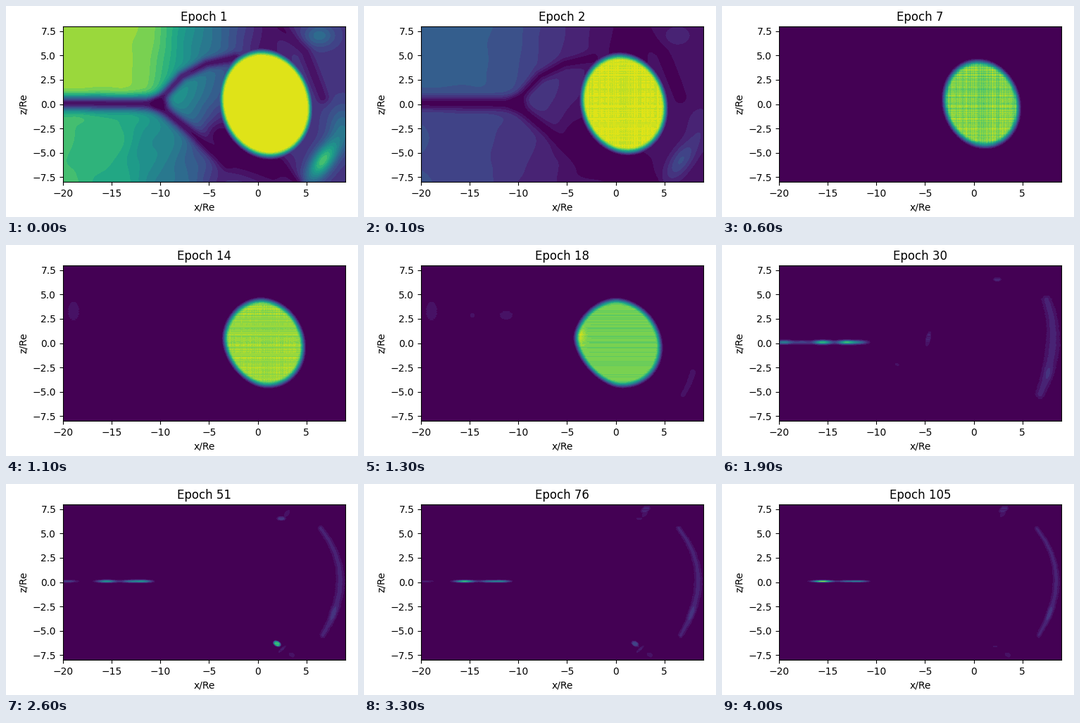
These frames come from a looping animation (500x300 px, 4.1 s). A matplotlib script:

```python
import numpy as np
import matplotlib.pyplot as plt
from matplotlib.animation import FuncAnimation

W, H = 500, 300
LEFT, RIGHT, TOP, BOTTOM = 81, 482, 29, 250
FRAMES = 41
STEP = 0.05

# All shapes below are placed in stage pixels.
X, Y = np.meshgrid(np.arange(LEFT, RIGHT) + 0.5, np.arange(TOP, BOTTOM) + 0.5)
rng = np.random.default_rng(4)
ROWS = rng.uniform(-1, 1, (BOTTOM - TOP, 1))
COLS = rng.uniform(-1, 1, (1, RIGHT - LEFT))

# Dark lanes: depth, width, path
LANES = [(.90, 11, [(70, 138), (220, 139)]),
         (.80, 8, [(215, 137), (250, 100), (285, 82), (325, 74)]),
         (.85, 9, [(215, 140), (258, 175), (315, 225)]),
         (.95, 25, [(305, 185), (335, 218), (380, 232)]),
         (.60, 9, [(390, 30), (425, 65), (450, 130)]),
         (.80, 8, [(385, 222), (412, 250)])]

# Faint patches: x, y, half width, half height, tilt, first, last, strength
PATCHES = [(96, 94, 11, 19, 0, 8, 17, .08),
           (154, 100, 4, 5, 0, 10, 16, .08),
           (202, 100, 13, 9, 0, 10, 17, .08),
           (293, 133, 5, 14, -.2, 13, 23, .10),
           (249, 170, 4, 3, .4, 16, 22, .08),
           (391, 49, 8, 4, 0, 17, 34, .15),
           (399, 42, 5, 7, -.5, 22, 50, .08),
           (400, 36, 8, 7, -.5, 28, 50, .11),
           (385, 227, 6, 5, .4, 21, 34, .65),
           (392, 235, 4, 7, -.9, 22, 38, .09),
           (388, 231, 4, 2, 0, 30, 50, .08),
           (406, 243, 6, 5, .4, 23, 50, .08)]

# Arc on the right: start, middle and end point at each key frame
ARC_TIMES = [13, 19, 26]
ARC_POINTS = [[467, 181, 462, 196, 453, 213],
              [461, 78, 470, 140, 452, 212],
              [447, 63, 475, 135, 450, 215]]


def key(n, times, values):
    """Linear interpolation of key values (scalars or rows) at frame n."""
    table = np.array(values, float).reshape(len(times), -1)
    out = np.array([np.interp(n, times, col) for col in table.T])
    return out if len(out) > 1 else out[0]


def blob(x, y, rx, ry, tilt=0):
    dy = Y - y
    return np.exp(-((X - x - tilt * dy) / rx) ** 2 - (dy / ry) ** 2)


def path_distance(path):
    best = np.full(X.shape, 1e9)
    for (x0, y0), (x1, y1) in zip(path[:-1], path[1:]):
        dx, dy = x1 - x0, y1 - y0
        t = np.clip(((X - x0) * dx + (Y - y0) * dy) / (dx * dx + dy * dy), 0, 1)
        best = np.minimum(best, np.hypot(X - x0 - t * dx, Y - y0 - t * dy))
    return best


def first_field():
    north = np.interp(X + 0.12 * (Y - 60), [170, 205, 245, 305, 365],
                      [.87, .82, .58, .34, .08])
    south = np.interp(X + 0.2 * (Y - 200), [90, 170, 235, 280, 310],
                      [.71, .63, .43, .30, .17])
    east = (.18 + .2 * blob(445, 42, 22, 16) + .2 * blob(478, 172, 22, 32)
            + .55 * blob(450, 220, 17, 28, -.5))
    ripple = 0.02 * np.sin(X / 13 + np.sin(Y / 17)) * np.cos(Y / 21)
    side = 1 / (1 + np.exp((139 - Y) / 7))
    field = north * (1 - side) + (south + ripple) * side + ripple / 2
    mix = 1 / (1 + np.exp((400 - X) / 8))
    field = field * (1 - mix) + east * mix
    for depth, width, path in LANES:
        field *= 1 - depth * np.exp(-(path_distance(path) / width) ** 2)
    return field


FIRST = first_field()


def disc(n):
    level = key(n, [0, 3, 6, 11, 13, 15, 16, 18],
                [.98, .9, .83, .87, .81, .5, .25, 0])
    if level == 0:
        return 0
    cx, rx, ry = key(n, [0, 2, 6, 11, 13, 17],
                     [(369, 70, 81), (369, 61, 69), (368.5, 58.5, 66),
                      (366.5, 61.5, 66.5), (361, 65.5, 66), (354, 66, 64)])
    nose = key(n, [9, 13], [0, 1])
    u = (X - cx) / rx
    v = (Y - 139 - 0.11 * (X - cx)) / ry
    p = np.where(u < 0, 2 - 0.3 * nose, 2)
    r = (np.abs(u) ** p + np.abs(v) ** p) ** (1 / p)
    edge = np.clip((1 - r) * rx / 12, 0, 1)
    edge = edge * edge * (3 - 2 * edge)
    row = key(n, [0, 6, 13], [.01, .08, .04])
    col = key(n, [0, 6, 11, 13], [.01, .07, .02, 0])
    glow = 0.13 * nose * blob(306, 128, 8, 14)
    return edge * (level * (1 + row * ROWS + col * COLS) + glow)


def sheet(n):
    bumps = [(88, 13, [.45, .22, 0]), (114, 12, [.22, 0, 0]),
             (143, 13, [.7, .55, .9]), (176, 12, [.66, .35, .28]),
             (194, 13, [.35, .5, .42])]
    along = sum(key(n, [19, 26, 40], a) * np.exp(-((X - x) / w) ** 2)
                for x, w, a in bumps)
    along = along * np.clip((215 - X) / 6, 0, 1) * key(n, [13, 18], [0, 1])
    height = key(n, [13, 19, 26, 40], [4, 2.8, 1.9, 1.4])
    return along * np.exp(-((Y - 138.3) / height) ** 2)


def arc(n):
    level = key(n, [11, 13, 19], [0, .08, .12])
    if level == 0:
        return 0
    a, b, c = key(n, ARC_TIMES, ARC_POINTS).reshape(3, 2)
    bend = 2 * b - (a + c) / 2
    path = [a * (1 - t) ** 2 + 2 * bend * t * (1 - t) + c * t * t
            for t in np.linspace(0, 1, 9)]
    width = key(n, [13, 19, 26, 40], [7, 11, 7, 5.5])
    width = width * (1 - 0.35 * np.abs(Y - 145) / 75) * (1 + 0.1 * ROWS)
    bright = 0.07 * key(n, [15, 20], [0, 1]) * blob(465, 184, 8, 12)
    return (level + bright) * np.exp(-(path_distance(path) / width) ** 2)


def patch(n, x, y, rx, ry, tilt, first, last, strength):
    level = strength * np.clip(min(n - first, last - n) / 3, 0, 1)
    if level == 0:
        return 0
    dy = Y - y
    q = np.hypot((X - x - tilt * dy) / rx, dy / ry)
    return level * np.clip(2 * (1 - q), 0, 1) * (1 + 0.15 * ROWS)


def picture(n):
    fade = key(n, [0, 1, 2, 4], [1, .35, .12, 0])
    field = np.maximum(FIRST * fade, disc(n))
    for part in [sheet(n), arc(n)] + [patch(n, *p) for p in PATCHES]:
        field = np.maximum(field, part)
    return np.floor(np.clip(field, 0, 1) / STEP) * STEP


def epoch(n):
    return int(round(key(n, [0, 6, 11, 13, 19, 26, 33, 40],
                         [1, 7, 14, 18, 30, 51, 76, 105])))


fig = plt.figure(figsize=(W / 100, H / 100), dpi=100, facecolor="white")
ax = fig.add_axes([LEFT / W, 1 - BOTTOM / H, (RIGHT - LEFT) / W, (BOTTOM - TOP) / H])
image = ax.imshow(picture(0), cmap="viridis", vmin=0, vmax=1, aspect="auto",
                  extent=(-20, 9, -8, 8), interpolation="nearest")
ax.set_xticks(range(-20, 6, 5))
ax.set_yticks(np.arange(-7.5, 7.6, 2.5))
ax.set_xlabel("x/Re")
ax.set_ylabel("z/Re")
title = ax.set_title("Epoch 1")


def update(n):
    image.set_data(picture(n))
    title.set_text(f"Epoch {epoch(n)}")
    return image, title


anim = FuncAnimation(fig, update, frames=FRAMES, interval=100, repeat=True,
                     repeat_delay=0)
plt.show()
```
